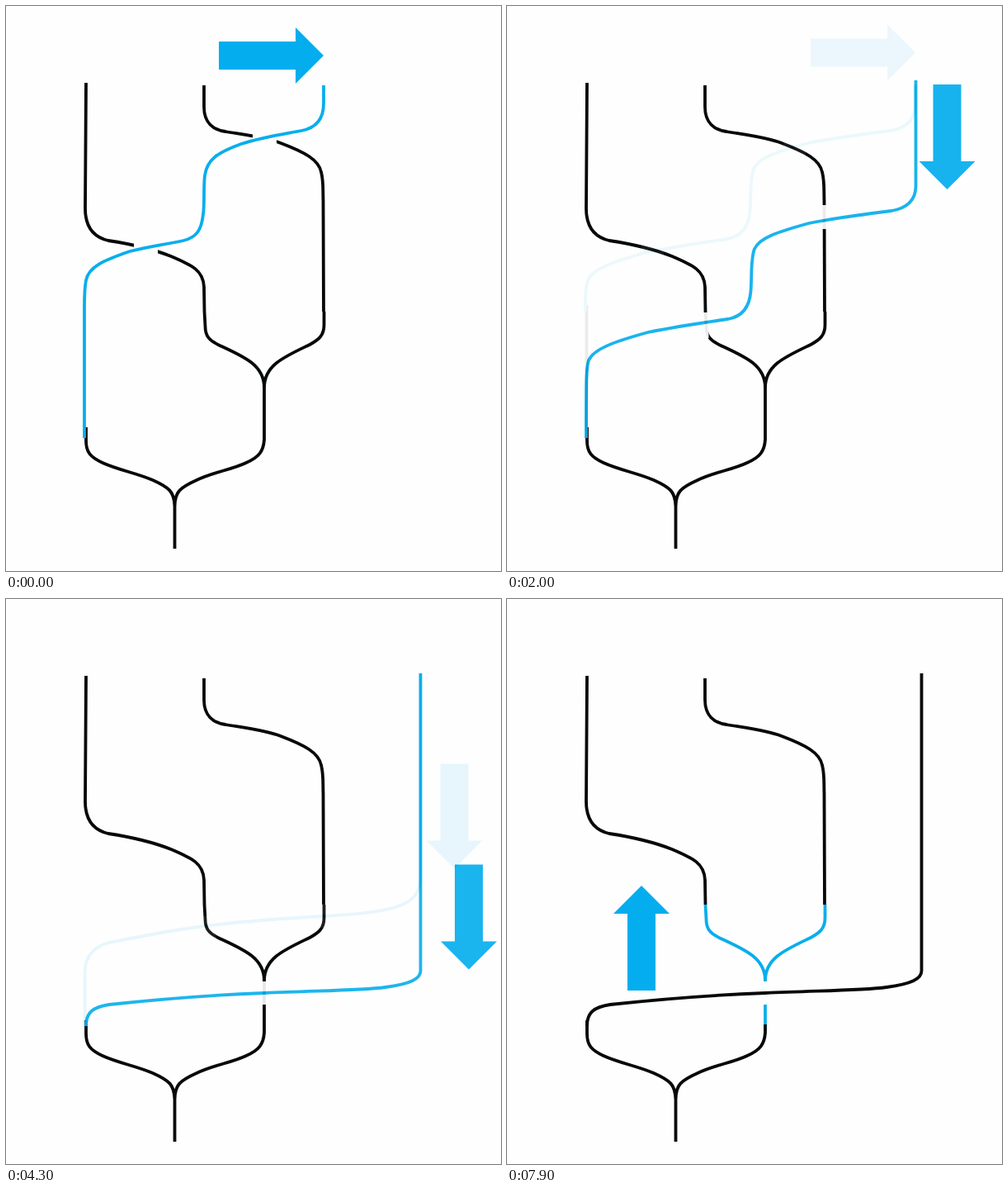
An HTML page that plays this animation: 600x684 px, repeating every 8000 ms.

```html
<!DOCTYPE html>
<html lang="en">
<head>
<meta charset="utf-8">
<title>Strand diagram</title>
<style>
  html, body { margin: 0; width: 100%; height: 100%; overflow: hidden; background: #fefefe; }
  svg { display: block; }
  path { fill: none; stroke-width: 3.8; }
  .black { stroke: #060809; }
  .blue { stroke: #08aeec; }
  .arrow { fill: #04adee; }
  .paper { fill: #fefefe; }
</style>
</head>
<body>
<svg id="stage" width="600" height="684" viewBox="0 0 600 684"></svg>
<script>
const LOOP = 8000, STEP = 100;

// Fixed strands
const leftTop = 'M97,93 L96,245 C96,268 107,280 124,284 C150,288 175,293 200,303 C226,314 239,320 240,340 L240.5,370';
const rightTop = 'M240,96 V122 C240,141 251,150 266,152 C290,156 315,159 333,166 C362,177 379,186 382,201 C385,212 384,222 384.5,236 L385,370';
const cup = 'M240.5,370 L241.5,388 C241.5,400 247,405 257,410 C287,424 313,434 313,462'
          + ' M385.5,370 V386 C385.5,399 379,404 369,409.5 C339,424 313,434 313,462';
const stemTop = 'M313,461 V515';
const base = 'M97,510 V526 C97,540 102,546 117,553 C137,562 157,565 178,574 C198,583 204,588 204.5,606 V657'
           + ' M313,515 V525 C312,539 307,546 291,553 C272,562 251,564 231,574 C211,583 204.5,588 204.5,606';
const leftLow = 'M96.5,362 V514';

// Moving strand, one path per pose
const swing = 'C494,140 482,148 465,151 C425,156 395,160 365,166 C325,177 305,184 299,197'
            + ' C294,210 296,230 294.5,248 C293,268 284,279 267,282 C225,288 205,291 170,298'
            + ' C130,309 104,318 98,332 C95,342 95,350 95,';
const strand = {
  near: 'M385,96 V118 C385,138 374,148 358,151 C325,157 310,159 285,167 C255,178 244,186 241,205'
      + ' C239,222 241,238 239,252 C237,270 232,280 215,284 C185,290 175,291 150,297'
      + ' C118,308 100,316 97,332 C95,342 95,350 95,365 V523',
  wide: 'M494.5,96 V122 ' + swing + '370',
  drop: 'M494.5,-7 V122 ' + swing + '426',
  lower: 'M502,90 V338 C502,356 494,366 472,373 C445,381 415,382 385,384 C330,387 290,390 240,396'
       + ' C200,401 160,409 125,416 C105,421 96,433 95.5,452 V523',
  low: 'M502.5,90 V450 C502.5,460 490,466 460,470 C430,474 380,474 313,477 C260,479 190,484 125,491'
     + ' C106,494 97,500 97,517'
};

const path = (cls, d, extra = '') => `<path class="${cls}" d="${d}" ${extra}/>`;
const gap = (x, y, w, h) => `<rect class="paper" x="${x}" y="${y}" width="${w}" height="${h}"/>`;
const arrow = (x, y, turn) =>
  path('arrow', 'M0,0 L-34,-34 V-17 H-127 V17 H-34 V34 Z', `transform="translate(${x} ${y}) rotate(${turn})"`);
const tops = path('black', leftTop) + path('black', rightTop);
const tree = tops + path('black', cup) + path('black', stemTop) + path('black', base);
const lowGap = gap(303, 463, 20, 28);

// start and end of each dissolve, with the picture it brings in
const scenes = [
  { from: -1, to: 0, art: tree + gap(299, 143, 29, 32) + gap(155, 278, 29, 32)
      + path('blue', strand.near) + arrow(385, 60, 0) },
  { from: 80, to: 1000, art: tree + path('black', leftLow) + gap(335, 155, 27, 34) + gap(163, 282, 27, 30)
      + path('blue', strand.wide) + arrow(495, 56.5, 0) },
  { from: 1250, to: 2150, art: tree + gap(374, 241, 20, 29) + gap(230, 371, 14.5, 31)
      + path('blue', strand.drop, 'transform="translate(1 97)"') + arrow(533.5, 222, 90) },
  { from: 2650, to: 3380, art: tree + gap(374, 369, 20, 29) + gap(230, 384, 24.5, 36)
      + path('blue', strand.lower) + arrow(543.5, 326.5, 90) },
  { from: 3680, to: 4440, art: tree + lowGap + path('blue', strand.low) + arrow(561, 448.5, 90) },
  { from: 4950, to: 5620, art: tree + lowGap + path('black', strand.low) },
  { from: 6250, to: 7250, art: tops + path('black', base) + path('blue', cup) + path('blue', stemTop)
      + lowGap + path('black', strand.low) + arrow(163, 347, -90) }
];

const stage = document.getElementById('stage');
stage.innerHTML = scenes.map(s => `<g><rect class="paper" width="600" height="684"/>${s.art}</g>`).join('');
const layers = [...stage.children];

function smooth(t, from, to) {
  const p = Math.min(1, Math.max(0, (t - from) / (to - from)));
  return p * p * (3 - 2 * p);
}

const begin = performance.now();
function draw(now) {
  const t = Math.floor((Math.max(0, now - begin) % LOOP) / STEP) * STEP;
  scenes.forEach((s, i) => layers[i].setAttribute('opacity', smooth(t, s.from, s.to)));
  requestAnimationFrame(draw);
}
draw(begin);
</script>
</body>
</html>
```
